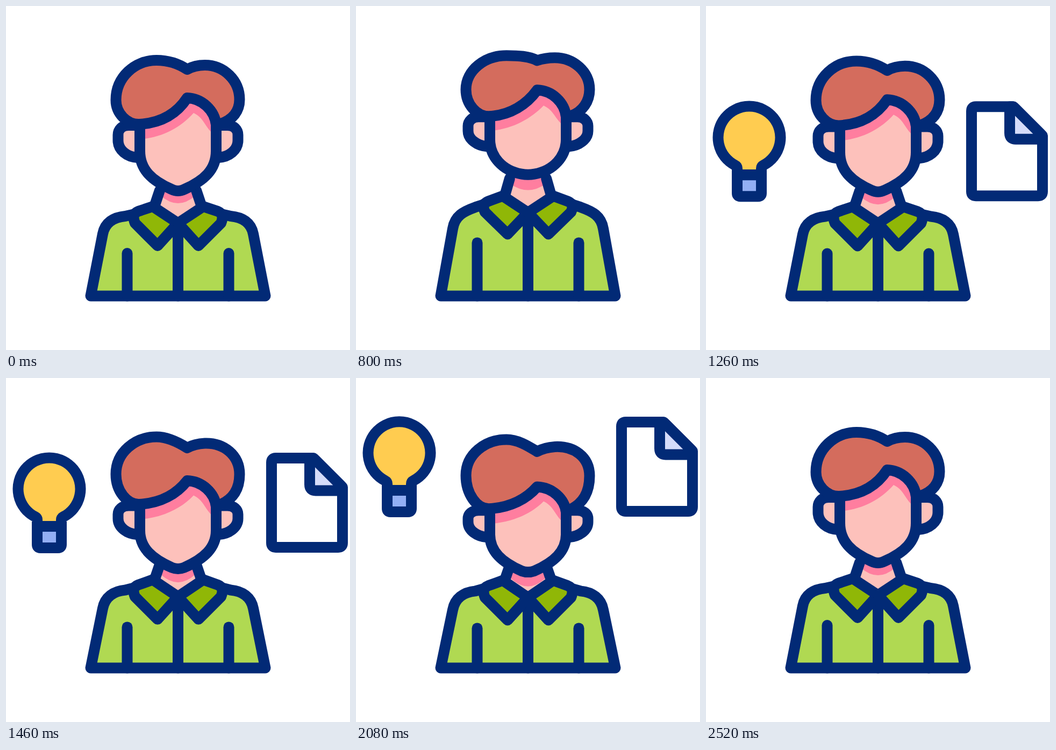
Animation of 640x640 px, one loop 3.28 s. Source, as an HTML page:

```html
<!DOCTYPE html>
<html>
<head>
<meta charset="utf-8">
<style>
  html, body { margin: 0; width: 100%; height: 100%; overflow: hidden; background: #fff; }
  svg { display: block; width: 100vw; height: 100vh; }
  path { stroke-linecap: round; stroke-linejoin: round; }
</style>
</head>
<body>
<svg viewBox="0 0 640 640">
  <g id="person"></g>
  <g id="icons" stroke="#022a76" stroke-width="20">
    <path fill="#ffcc50" d="M58,209V197Q58,193 54,191A58,58 0 1 1 107,191Q103,193 103,197V209Z"/>
    <path fill="#93aff4" d="M58,209H103V243Q103,249 97,249H64Q58,249 58,243Z"/>
    <path fill="#fff" d="M502,82H568Q572,82 575,85L622,132Q626,136 626,141V240Q626,248 618,248H502Q494,248 494,240V90Q494,82 502,82Z"/>
    <path fill="#d5dcfa" d="M565,82V131Q565,142.5 576,142.5H626V136L572,82Z"/>
  </g>
</svg>
<script>
const LOOP = 3280;
const NAVY = '#022a76', SKIN = '#fdc1bb', PINK = '#ff7e9f', HAIR = '#d46c5d',
      GREEN = '#b0d952', DARK_GREEN = '#90b707';
const person = document.getElementById('person');
const icons = document.getElementById('icons');
const parts = [];

// Points read "x,y-a+b": a is the shift in the stretched pose, b in the squashed one.
function part(shape, fill, stroked, mirrored) {
  const el = document.createElementNS('http://www.w3.org/2000/svg', 'path');
  el.setAttribute('fill', fill);
  if (stroked) {
    el.setAttribute('stroke', NAVY);
    el.setAttribute('stroke-width', 20);
  }
  if (mirrored) el.setAttribute('transform', 'matrix(-1 0 0 1 640 0)');
  person.append(el);
  parts.push({ el, shape });
}

function pair(shape, fill) {
  part(shape, fill, true);
  part(shape, fill, true, true);
}

// Neck
part('M284,335-23+7 L278,368-19+6 L320,396-20+5 L362,368-19+6 L356,335-23+7Z', SKIN);
part('M286,330-23+18 L288,353-22+22 Q320,381-28+24 352,353-22+22 L354,330-23+18Z', PINK);
pair('M286,343-23+7 L278,367-19+6', 'none');

// Body
pair('M320,539.5 L157.5,539.5 L180,424-10+8 C184,403-13+8 200,393-11+6 222,391-17+6 ' +
  'L240,387-19+5 L282,443-20+5 L320,404-20+5Z', GREEN);
pair('M225.5,460-20+6 L225.5,539.5', 'none');
pair('M246,382-19+5 Q233,387-19+5 240,404-21+5 L282,446-22+5 L320,404-20+5 L273,373-20+4Z', DARK_GREEN);

// Head
pair('M249,222-16+27 L228,222-16+27 C216,222-16+27 208.5,230-16+26 208.5,240-17+24 ' +
  'L208.5,250-18+20 C208.5,268-21+17 225,281-21+16 245,282-21+16', SKIN);
const face = 'M249,222-16+27 L249,270-22+24 C249,305-26+20 272,325-19+20 308,341-29+20 ' +
  'Q320,347-33+18 332,341-29+20 C368,325-19+20 391,305-26+20 391,270-22+24 L391,221-15+32';
part(face + ' L338,165-15+35Z', SKIN);
part('M249,215-15+26 L249,248-16+26 C290,245-16+26 325,226-16+31 349,199-14+34 ' +
  'C370,209-14+34 368,225-16+34 391,243-16+34 L391,200-15+30 L340,165-15+35Z', PINK);
part('M247,220-15+26 C225,220-15+26 204.5,200-17+18 204.5,175-20+7 ' +
  'C204.5,132-13+11 240,101-9+15 280,101-9+15 C302,101-9+15 322,108-15+22 337,118-17+21 ' +
  'C346,113-15+21 357,110-14+21 370,110-14+20 C405,110-14+18 434.5,138-16+9 434.5,174-19+9 ' +
  'C434.5,196-19+20 422,211-15+24 400,219-15+28 L391,221-15+32 ' +
  'C388,194-15+34 365,172-15+35 337,171-15+35 C318,200-18+27 288,218-15+26 247,220-15+26Z', HAIR, true);
part(face, 'none', true);

const clamp = x => Math.max(0, Math.min(1, x));
const smooth = x => x * x * (3 - 2 * x);
const ramp = (t, from, to) => clamp((t - from) / (to - from));

// Time and pose: -1 stretched, 0 at rest, 1 squashed
const keys = [[480, 0], [785, -1], [1050, 1], [1310, 0], [1575, .95], [1830, 0], [2090, .9], [2370, 0]];

function poseAt(t) {
  return keys.slice(1).reduce((pose, [time, value], i) =>
    pose + (value - keys[i][1]) * smooth(ramp(t, keys[i][0], time)), 0);
}

function draw(t) {
  const pose = poseAt(t);
  const move = (_, x, y, up, down) => x + ',' + (+y + (pose < 0 ? -pose * up : pose * down)).toFixed(2);
  for (const { el, shape } of parts)
    el.setAttribute('d', shape.replace(/([\d.]+),(\d+)(-\d+)(\+\d+)/g, move));

  const rise = 46 * Math.max(0, (2700 - t) / 1000) ** 2.6 - 13.3;
  icons.setAttribute('transform', `translate(0 ${rise.toFixed(2)})`);
  icons.setAttribute('opacity', ramp(t, 820, 1066) * (1 - ramp(t, 2260, 2515)));
}

const start = performance.now();
function tick() {
  draw((performance.now() - start) % LOOP);
  requestAnimationFrame(tick);
}
tick();
</script>
</body>
</html>
```
